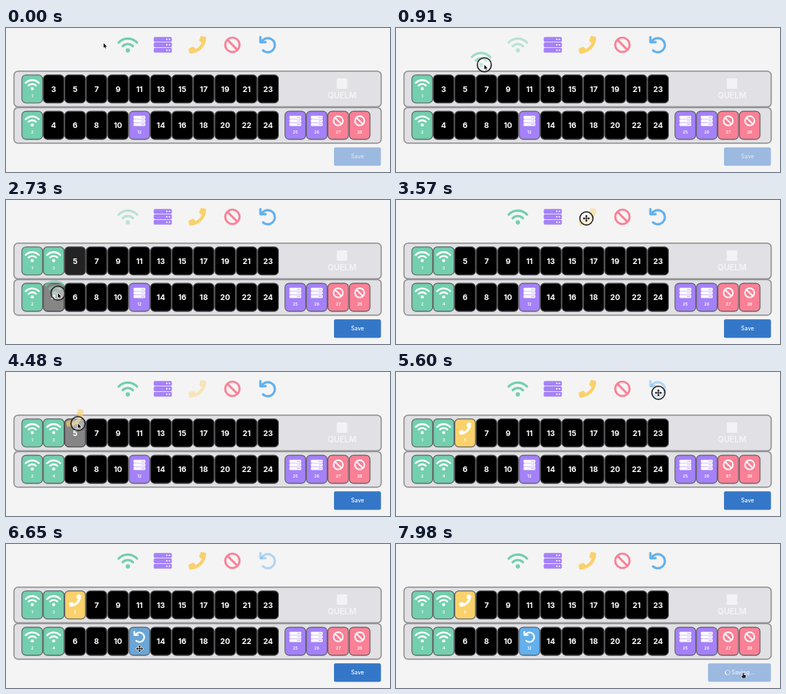
An HTML page with a canvas that plays this animation: 480 px wide and 180 px high, repeating every 8.05 s.

```html
<!DOCTYPE html>
<html lang="en">
<head>
<meta charset="utf-8">
<title>Switch port editor</title>
<style>
  html, body { margin: 0; width: 100%; height: 100%; overflow: hidden; background: #f4f4f4; }
  canvas { display: block; width: 480px; height: 180px; }
</style>
</head>
<body>
<canvas id="stage"></canvas>
<script>
const canvas = document.getElementById('stage');
const ctx = canvas.getContext('2d');
const dpr = window.devicePixelRatio || 1;
canvas.width = 480 * dpr;
canvas.height = 180 * dpr;

const LOOP = 8050;
const FADE = 200;
const FONT = 'Inter, "Open Sans", sans-serif';
const COLORS = { wifi: '#73cfae', server: '#a481f8', phone: '#fad16a', ban: '#fa8096', undo: '#62b0ed' };
const TOOLS = { wifi: 152.3, server: 196, phone: 239.2, ban: 283, undo: 327.3 };
const PORT_SCALE = { wifi: .72, server: .65, phone: .7, ban: .65, undo: .68 };
const INITIAL = { 1: 'wifi', 2: 'wifi', 12: 'server', 25: 'server', 26: 'server', 27: 'ban', 28: 'ban' };

// press: button down, move: drag begins, drop: button up
const DRAGS = [
  { icon: 'wifi', port: 3, press: 500, move: 560, drop: 1400 },
  { icon: 'wifi', port: 4, press: 1930, move: 2000, drop: 2880 },
  { icon: 'phone', port: 5, press: 3550, move: 3620, drop: 4600 },
  { icon: 'undo', port: 12, press: 5540, move: 5650, drop: 6500 }
];
const SAVE_DOWN = 7550, SAVE_UP = 7680;

// time, x, y, vertical bend of the segment leading there
const PATH = [
  [0, 122, 19, 0], [400, 151, 22, 0], [560, 151, 22, 0],
  [1300, 63, 74, 0], [1450, 64, 76, 0], [1800, 150, 23, 6], [2000, 151, 23, 0],
  [2650, 65, 116.5, -8], [2900, 65, 116.5, 0], [3450, 238, 23, 0], [3620, 238, 23, 0],
  [4150, 90, 64.5, 0], [4650, 90, 64.5, 0], [5400, 328, 26, 0], [5650, 328, 26, 0],
  [6400, 167, 130, 0], [6750, 167, 131, 0], [7450, 434, 161, 0], [LOOP, 434, 161, 0]
];

const ports = [];
for (let n = 1; n <= 24; n++) ports.push({ n, x: 32.8 + 26.8 * ((n - 1) >> 1), y: n % 2 ? 76.2 : 121.6 });
for (let n = 25; n <= 28; n++) ports.push({ n, x: 361.7 + 26.8 * (n - 25), y: 121.6 });

const clamp = v => Math.max(0, Math.min(1, v));
const dragAt = t => DRAGS.find(d => t >= d.press && t < d.drop);
const isOver = (p, c) => Math.abs(c.x - p.x) < 13.2 && Math.abs(c.y - p.y) < 18;

function pointer(t) {
  const i = Math.max(1, PATH.findIndex(k => k[0] >= t));
  const [t0, x0, y0] = PATH[i - 1], [t1, x1, y1, bend] = PATH[i];
  const u = clamp((t - t0) / (t1 - t0)), s = u * u * (3 - 2 * u);
  return { x: x0 + (x1 - x0) * s, y: y0 + (y1 - y0) * s + bend * 4 * u * (1 - u) };
}

// Share of the last moments spent dragging over a port
function hover(port, t) {
  let hits = 0;
  for (let i = 0; i < 30; i++) {
    const s = t - i * 10, d = s >= 0 && dragAt(s);
    if (d && s >= d.move && isOver(port, pointer(s))) hits++;
  }
  return Math.min(1, hits / 15);
}

function box(x, y, w, h, r, fill, stroke, width = 1) {
  ctx.beginPath();
  ctx.roundRect(x, y, w, h, r);
  if (fill) { ctx.fillStyle = fill; ctx.fill(); }
  if (stroke) { ctx.strokeStyle = stroke; ctx.lineWidth = width; ctx.stroke(); }
}

function text(str, x, y, size, weight, fill = '#fff') {
  ctx.font = `${weight} ${size}px ${FONT}`;
  ctx.textAlign = 'center';
  ctx.textBaseline = 'alphabetic';
  ctx.fillStyle = fill;
  ctx.fillText(str, x, y + size * .36);
}

function arc(x, y, r, from, to) {
  ctx.beginPath();
  ctx.arc(x, y, r, from * Math.PI, to * Math.PI);
}

const handset = new Path2D('M9.9-9.9 5.2-11Q4.4-11 4-10.3L2.4-5.5Q2.2-4.8 2.8-4.3L5.4-2.2C3.8 1 1.1 3.8-2.2 5.4L-4.3 2.8Q-4.8 2.2-5.5 2.5L-10.3 4.4Q-11.2 4.9-11 5.7L-10 10.2Q-9.7 11-9 11C2 11 11 2 11-9Q11-9.7 9.9-9.9Z');

const GLYPHS = {
  wifi() {
    ctx.lineWidth = 3;
    arc(0, 8, 15.8, -.76, -.24); ctx.stroke();
    arc(0, 8, 9, -.75, -.25); ctx.stroke();
    arc(0, 7, 2.7, 0, 2); ctx.fill();
  },
  server(back) {
    for (const y of [-9.8, -3, 3.8]) box(-11.3, y, 22.6, 6, 1.5, ctx.fillStyle);
    ctx.fillStyle = back;
    for (const y of [-6.8, 0, 6.8]) for (const x of [5, 8.3]) { arc(x, y, 1, 0, 2); ctx.fill(); }
  },
  phone() { ctx.fill(handset); },
  ban() {
    ctx.lineWidth = 2.7;
    arc(0, 0, 9, 0, 2);
    ctx.moveTo(-6.2, -6.2); ctx.lineTo(6.2, 6.2);
    ctx.stroke();
  },
  undo() {
    ctx.lineWidth = 2.9;
    arc(0, .5, 8.8, -.86, .74); ctx.stroke();
    ctx.beginPath();
    ctx.moveTo(-9.3, -9.5); ctx.lineTo(-9.3, -3.3); ctx.lineTo(-2.8, -3.3);
    ctx.stroke();
  }
};

function glyph(name, x, y, scale, color, alpha, back) {
  ctx.save();
  ctx.translate(x, y);
  ctx.scale(scale, scale);
  ctx.globalAlpha = alpha;
  ctx.fillStyle = ctx.strokeStyle = color;
  ctx.lineCap = ctx.lineJoin = 'round';
  GLYPHS[name](back);
  ctx.restore();
}

function drawPort(p, t) {
  const drop = DRAGS.find(d => d.port === p.n && t >= d.drop);
  const icon = drop ? drop.icon : INITIAL[p.n];
  const fill = layer => box(p.x - 13, p.y - 17.6, 26, 35.2, 5, layer);
  fill(COLORS[INITIAL[p.n]] || '#000');
  ctx.globalAlpha = hover(p, t);
  fill('#858585');
  if (drop) {
    ctx.globalAlpha = clamp((t - drop.drop) / FADE);
    fill(COLORS[icon]);
  }
  ctx.globalAlpha = 1;
  box(p.x - 12.9, p.y - 17.5, 25.8, 35, 5, null, icon ? '#626568' : '#4c4c50', 1.1);
  if (icon) {
    glyph(icon, p.x, p.y - 5.5, PORT_SCALE[icon], '#fff', 1, COLORS[icon]);
    text(p.n, p.x, p.y + 8.8, 5, 700, 'rgba(255,255,255,.9)');
  } else {
    text(p.n, p.x, p.y, 9.6, 700);
  }
}

function drawPanels() {
  for (const y of [54, 99.4]) box(10, y, 459, 44.6, 5, '#e1e0e4', '#929294', 1.5);
  box(413.5, 63, 13, 13, 0, '#f3f3f6');
  text('QUELM', 420, 84, 10, 700, '#f3f3f6');
}

function drawButton(t) {
  const saving = t >= SAVE_UP;
  const x = saving ? 390 : 410;
  box(x, 149.3, 468.6 - x, 22.9, 2, '#9cb9e0');
  if (!saving) {
    const on = clamp((t - DRAGS[0].drop) / FADE);
    ctx.globalAlpha = on;
    box(x, 149.3, 58.6, 22.9, 2, '#3477c8');
    ctx.globalAlpha = .65 + .35 * on;
    text('Save', 439.5, 160.4, 7, 500);
    ctx.globalAlpha = 1;
    return;
  }
  const turn = (t - SAVE_UP) / 500;
  ctx.lineWidth = 1;
  ctx.strokeStyle = 'rgba(255,255,255,.5)';
  arc(414.5, 160.6, 3, 0, 2); ctx.stroke();
  ctx.strokeStyle = '#fff';
  arc(414.5, 160.6, 3, turn, turn + .6); ctx.stroke();
  text('Saving...', 434, 160.4, 7, 500, 'rgba(255,255,255,.85)');
}

const ARROW = new Path2D('M0 0V7.2L1.7 5.7 2.8 8.2 4 7.7 2.9 5.3H5.2Z');
const HAND = new Path2D('M-.8 0Q0-.8.8 0V3L3.6 3.8Q4.3 4.2 4 5.4L3.2 8H-1L-3 5.2Q-2.6 4.2-.8 5.2Z');
const MOVE = new Path2D('M0-3.6V3.6M-3.6 0H3.6M-1.1-2.5 0-3.6 1.1-2.5M-1.1 2.5 0 3.6 1.1 2.5M-2.5-1.1-3.6 0-2.5 1.1M2.5-1.1 3.6 0 2.5 1.1');

function drawCursor(t, c, drag) {
  const dragging = drag && t >= drag.move;
  const overTool = c.y < 33 && Object.values(TOOLS).some(x => Math.abs(c.x - x) < 13);
  const overPort = ports.some(p => isOver(p, c) &&
    (INITIAL[p.n] || DRAGS.some(d => d.port === p.n && t >= d.drop)));
  const overSave = c.x > 410 && c.y > 149;

  ctx.save();
  ctx.translate(c.x, c.y);
  if (drag || (t >= SAVE_DOWN && t < SAVE_UP)) {
    arc(0, 0, dragging ? 8.8 : 8.2, 0, 2);
    ctx.fillStyle = 'rgba(255,255,255,.35)';
    ctx.fill();
    ctx.strokeStyle = '#222';
    ctx.lineWidth = 1.5;
    ctx.stroke();
  }
  ctx.lineJoin = 'round';
  ctx.strokeStyle = '#fff';
  ctx.fillStyle = '#111';
  if (!dragging && (overTool || overPort)) {
    ctx.lineWidth = 2.4;
    ctx.stroke(MOVE);
    ctx.strokeStyle = '#111';
    ctx.lineWidth = 1.1;
    ctx.stroke(MOVE);
  } else {
    const shape = overSave ? HAND : ARROW;
    ctx.scale(.8, .8);
    ctx.lineWidth = 1.4;
    ctx.stroke(shape);
    ctx.fill(shape);
  }
  ctx.restore();
}

function draw(t) {
  ctx.setTransform(dpr, 0, 0, dpr, 0, 0);
  ctx.fillStyle = '#f4f4f4';
  ctx.fillRect(0, 0, 480, 180);

  // A dragged tool stays pale until its ghost has settled
  for (const name in TOOLS) {
    const pale = DRAGS.some(d => d.icon === name && t >= d.press && t < d.drop + 450);
    glyph(name, TOOLS[name], 21, 1, COLORS[name], pale ? .45 : 1, '#f4f4f4');
  }
  drawPanels();
  for (const p of ports) drawPort(p, t);
  drawButton(t);

  const c = pointer(t), drag = dragAt(t);
  if (drag && t >= drag.move) glyph(drag.icon, c.x - 4, c.y - 7, 1, COLORS[drag.icon], .65, '#f4f4f4');
  drawCursor(t, c, drag);
}

const start = performance.now();
function frame() {
  draw((performance.now() - start) % LOOP);
  requestAnimationFrame(frame);
}
frame();
</script>
</body>
</html>
```
